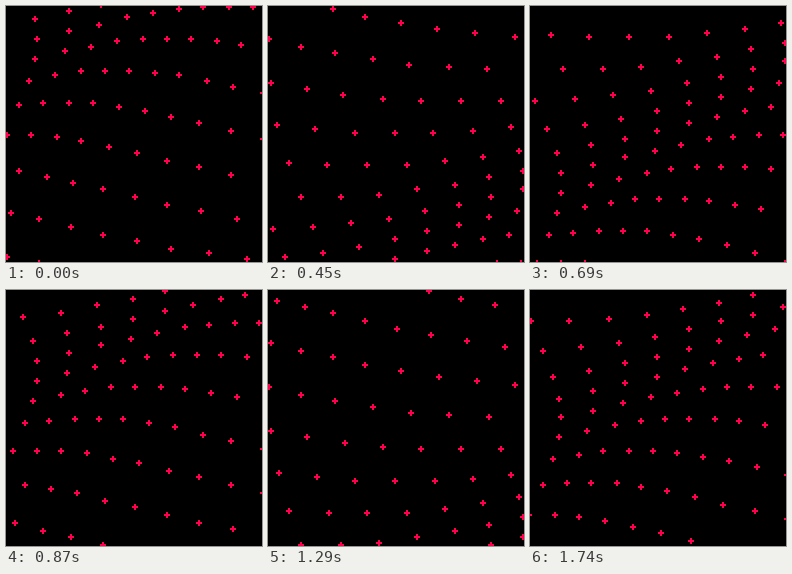
Recreate the animation shown at these times as an HTML page. Size 256 px wide and 256 px high, loop 1.77 s.

```html
<!DOCTYPE html>
<html lang="en">
<head>
<meta charset="utf-8">
<title>Swirling crosses</title>
<style>
  html, body { margin: 0; width: 100%; height: 100%; overflow: hidden; background: #000; }
  svg { display: block; width: 100%; height: 100%; }
</style>
</head>
<body>
<svg viewBox="0 0 128 128" shape-rendering="crispEdges">
  <rect width="128" height="128" fill="#000"/>
  <path id="crosses" fill="#ff004d"/>
</svg>
<script>
const STEP_MS = 30;
const STEPS = 59;
const CELLS = 10;
const SPACING = 16;
const RADIUS = 16;

// Angles in degrees
const START = -24.1;
const PER_STEP = 11.28;
const PER_COLUMN = 13.5;
const PER_ROW = 22.5;

const crosses = document.getElementById("crosses");

const cross = (x, y) =>
  `M${x} ${y - 1}h1v3h-1zM${x - 1} ${y}h3v1h-3z`;

// Each cross circles its own grid point, snapped to whole pixels.
function draw(step) {
  let d = "";
  for (let row = 0; row < CELLS; row++) {
    for (let col = 0; col < CELLS; col++) {
      const degrees = START + step * PER_STEP + col * PER_COLUMN + row * PER_ROW;
      const angle = degrees * Math.PI / 180;
      const x = Math.floor(col * SPACING + RADIUS * Math.cos(angle));
      const y = Math.floor(row * SPACING - RADIUS * Math.sin(angle));
      d += cross(x, y);
    }
  }
  crosses.setAttribute("d", d);
}

const startTime = performance.now();

function tick() {
  const elapsed = performance.now() - startTime;
  draw(Math.floor(elapsed / STEP_MS) % STEPS);
  requestAnimationFrame(tick);
}

tick();
</script>
</body>
</html>
```
